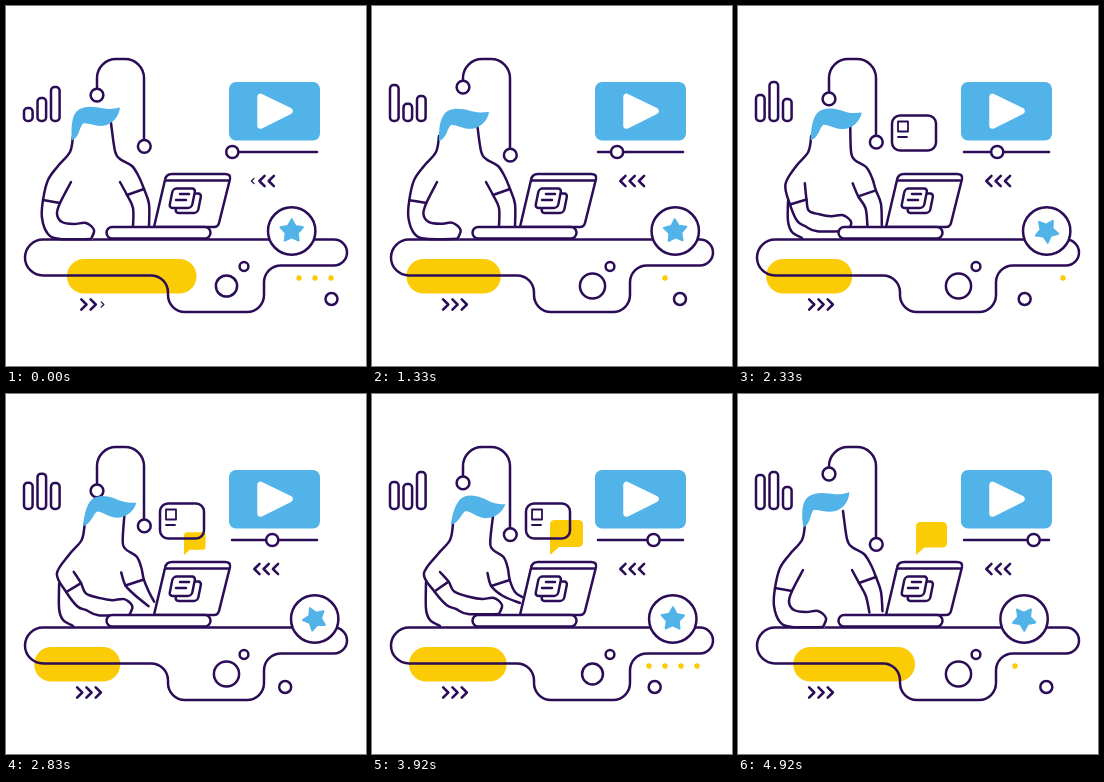
Write an HTML page with a canvas that moves like this. It is 360x360 px and loops after 5 s.

```html
<!DOCTYPE html>
<html lang="en">
<head>
<meta charset="utf-8">
<style>
html, body { margin: 0; width: 100%; height: 100%; overflow: hidden; background: #fff; }
canvas { display: block; width: 360px; height: 360px; }
</style>
</head>
<body>
<canvas id="stage"></canvas>
<script>
const LOOP = 5000, FRAMES = 60;
const INK = '#2b0c56', BLUE = '#51b3e7', YELLOW = '#fbcb05', WHITE = '#fff';
const canvas = document.getElementById('stage');
const ratio = window.devicePixelRatio || 1;
canvas.width = canvas.height = 360 * ratio;
const ctx = canvas.getContext('2d');

// Smooth 0 to 1 between two times.
function ease(t, from, to) {
  const u = Math.max(0, Math.min(1, (t - from) / (to - from)));
  return u * u * (3 - 2 * u);
}
// Rises to 1, holds, and falls back to 0.
const swing = (t, up, top, fall, end) => ease(t, up, top) - ease(t, fall, end);

function paint(path, fill, stroke = INK, width = 2.5) {
  if (fill) { ctx.fillStyle = fill; ctx.fill(path); }
  if (stroke) { ctx.strokeStyle = stroke; ctx.lineWidth = width; ctx.stroke(path); }
}
const draw = (d, fill, stroke, width) => paint(new Path2D(d), fill, stroke, width);

function circle(x, y, r, fill = WHITE, stroke = INK) {
  const path = new Path2D();
  path.arc(x, y, r, 0, Math.PI * 2);
  paint(path, fill, stroke);
}

function box(x, y, w, h, r, fill, stroke) {
  const path = new Path2D();
  path.roundRect(x, y, w, h, r);
  paint(path, fill, stroke);
}

function transformed(x, y, angle, scale, body) {
  ctx.save();
  ctx.translate(x, y);
  ctx.rotate(angle * Math.PI / 180);
  ctx.scale(scale, scale);
  body();
  ctx.restore();
}

// Smooth curve through [x, y] points.
function curve(points) {
  const at = i => points[Math.max(0, Math.min(points.length - 1, i))];
  const handle = (i, side) => at(i).map((v, a) => v + side * (at(i + 1)[a] - at(i - 1)[a]) / 6);
  return points.slice(1).reduce(
    (d, p, i) => `${d}C${handle(i, 1)} ${handle(i + 1, -1)} ${p}`, `M${points[0]}`);
}

function person(t) {
  const lean = swing(t, 1200, 3200, 3950, 4900);
  const head = swing(t, 1500, 3300, 3950, 4900);
  const reach = swing(t, 2100, 3200, 4000, 5300);
  const nod = ease(t, 0, 700) - 1.8 * ease(t, 3950, 4900);

  const slide = (x, y, dx, dy = 0, amount = lean) => [x + dx * amount, y + dy * amount];
  const hand = (x, y) => slide(x, y, 42, -13);
  const neck = (x, y) => slide(x, y, 14, 0, head);
  const front = (x, y) => slide(x, y, (182 - y) / 4, 3, head);
  // The upper arm turns about the shoulder.
  const upper = (x, y) => {
    const a = -lean * Math.PI / 4, c = Math.cos(a), s = Math.sin(a);
    return [54 + (x - 54) * c - (y - 165) * s, 165 + (x - 54) * s + (y - 165) * c];
  };

  const bx = 44 + 10 * lean;
  draw(curve([[bx, 206 - 18 * lean], [bx, 215], [bx + 4, 226], [bx + 14, 232]]));

  const shoulder = [neck(67, 130), neck(64, 146), neck(52, 160), upper(42, 174)];
  const outer = [upper(37, 194), upper(36, 212), hand(42, 228), hand(54, 233), hand(85, 233)];
  const inner = [upper(54, 197), upper(51, 208), hand(56, 216), hand(68, 218),
    hand(80, 217), hand(88, 224), hand(85, 233)];
  draw(curve([...outer, ...[...inner].reverse()]), WHITE, null);
  draw(curve([...shoulder, ...outer]));
  draw(curve([slide(65, 176, 3, 2), ...inner]));
  draw(curve([outer[0], inner[0]]));

  const cuff = front(138, 183), elbow = front(121, 189);
  draw(curve([front(105, 117), front(109, 145), front(114, 153), front(126, 160), front(133, 171),
    cuff, [143, 198], slide(143, 221, 7, -18, reach)]));
  draw(curve([front(114, 176), elbow, slide(127, 202, 4, 0, reach), slide(127, 221, 21, -12, reach)]));
  draw(curve([elbow, cuff]));

  transformed(90 + 2 * nod + 14 * head, 118.5 + 2.5 * nod, 4 * nod + 10 * head * head, 1, () => {
    ctx.translate(-90, -118);
    draw('M66 134C65 122 65 108 73 103C82 98 92 101 98 102C104 103 109 102 114 101' +
      'C113 110 107 117 99 119C90 121 83 116 77 117C73 121 74 130 66 134Z', BLUE, null);
  });
}

// Each bar steps through its own heights at a steady beat.
function bars(t) {
  [[102, 79, 89, 88, 81], [92, 98, 76, 90, 78], [81, 90, 93, 78, 93]].forEach((tops, i) => {
    const top = tops.reduce((y, next, k) =>
      y + (next - y) * ease(t, 1300 * (k - 1), 1300 * (k - 1) + 700));
    box(18 + 13.5 * i, top, 8.6, 115 - top, 3.6);
  });
}

function arch(t) {
  const wave = Math.cos(2 * Math.PI * (t - 1020) / 3900);
  const left = 88.5 - 8.5 * wave, right = 141 + 9.3 * wave;
  draw(`M91 ${left}V72A19 19 0 0 1 110 53H119A19 19 0 0 1 138 72V${right}`);
  circle(91, left, 6.4);
  circle(138.3, right, 6.4);
}

function player(t) {
  box(223, 76, 91, 58.5, 7, BLUE, null);
  draw('M254.5 91V119.5L283.5 105Z', WHITE, WHITE, 6.5);
  draw('M226 146H311');
  circle(226.3 + 14.1 * t / 1000, 146, 6.1);
}

function chevrons(t, x, y, dir) {
  const pitch = 9.3, shift = 4.2 + 5.1 * ease(t, 0, 1150);
  for (let i = -1; i < 3; i++) {
    const pos = i * pitch + shift;
    const past = Math.max(-pos, pos - 2 * pitch, 0);
    const scale = Math.min(1, 1.35 - .2 * past);
    if (scale > .4) {
      transformed(x + dir * pos, y, 0, scale, () =>
        draw(`M${-2.6 * dir} -5.2L${2.6 * dir} 0L${-2.6 * dir} 5.2`));
    }
  }
}

function messages(t) {
  const bubble = swing(t, 2580, 3000, 4850, 5300);
  const card = swing(t, 1580, 2000, 4170, 4580);
  if (bubble > 0) transformed(178, 161, 0, bubble, () =>
    draw('M0 0V-30Q0 -35 5 -35H28Q33 -35 33 -30V-13Q33 -8 28 -8H9Z', YELLOW, null));
  if (card > 0) transformed(176, 127, 0, card, () => {
    box(-22, -17.5, 44, 35, 8);
    draw('M-16 -11.5H-6V-1.5H-16ZM-16 4H-7', null, INK, 1.8);
  });
}

function laptop() {
  draw('M166 168H219Q225 168 224 173L213 217Q212 221 208 221H148L159 174Q160 168 166 168Z', WHITE);
  draw('M160 174.5H222');
  for (const [x, y] of [[173, 187.5], [167, 182.5]]) {
    ctx.save();
    ctx.transform(1, 0, -.2, 1, x, y);
    box(0, 0, 22.5, 19.5, 3.5, WHITE);
    ctx.restore();
  }
  draw('M174 188H183M170 194H180');
  box(100.5, 221, 104, 11.5, 5.7, WHITE);
}

function table(t) {
  const grow = 1 - swing(t, 0, 1850, 3050, 5600);
  box(28.2 + 32.8 * grow, 253, 86 + 43.5 * grow, 34.5, 17.2, YELLOW, null);
  draw('M37 233.5H328A13 13 0 0 1 328 259.5H275A17 17 0 0 0 258 276.5V289A17 17 0 0 1 241 306H179' +
    'A17 17 0 0 1 162 289V286.5A17 17 0 0 0 145 269.5H37A18 18 0 0 1 37 233.5Z');
  const dip = swing(t, -600, 600, 700, 1330) + swing(t, 3600, 4200, 4300, 4900);
  circle(220.5, 280, 12.6 - 4 * dip);
  circle(238, 260.5, 4.4);
}

function starBadge(t) {
  const x = 285.7 + 23 * swing(t, 240, 1840, 3170, 5060);
  circle(x, 225, 23.7);
  transformed(x, 225, -110 * t / 1000, 1, () => {
    let d = '';
    for (let i = 0; i < 10; i++) {
      const r = i % 2 ? 6.3 : 11.8, a = i * Math.PI / 5;
      d += `${i ? 'L' : 'M'}${r * Math.sin(a)} ${-r * Math.cos(a)}`;
    }
    draw(d + 'Z', BLUE, BLUE, 2);
  });
}

// Dots chase singly, light up together, then go out in turn.
function dots(t) {
  const phase = t % 4167;
  for (let i = 0; i < 4; i++) {
    const chase = phase - 500 - 525 * i;
    const on = phase < 125 * i || phase > 3500 + 80 * i || (chase >= 0 && chase < 500);
    if (on) circle(277 + 16 * i, 272, 2.7, YELLOW, null);
  }
}

function render(now) {
  const frame = Math.floor(((now % LOOP) + 5) * FRAMES / LOOP) % FRAMES;
  const t = frame * LOOP / FRAMES;
  ctx.setTransform(ratio, 0, 0, ratio, 0, 0);
  ctx.fillStyle = WHITE;
  ctx.fillRect(0, 0, 360, 360);
  ctx.lineCap = ctx.lineJoin = 'round';
  bars(t);
  arch(t);
  player(t);
  chevrons(t, 269.5, 175, -1);
  chevrons(t, 73.7, 298.5, 1);
  messages(t);
  table(t);
  person(t);
  laptop();
  starBadge(t);
  dots(t);
  circle(325.5 - 49 * swing(t, 0, 3300, 3330, 5970), 293, 6);
}

const start = performance.now();
function tick() {
  render(performance.now() - start);
  requestAnimationFrame(tick);
}
tick();
</script>
</body>
</html>
```
